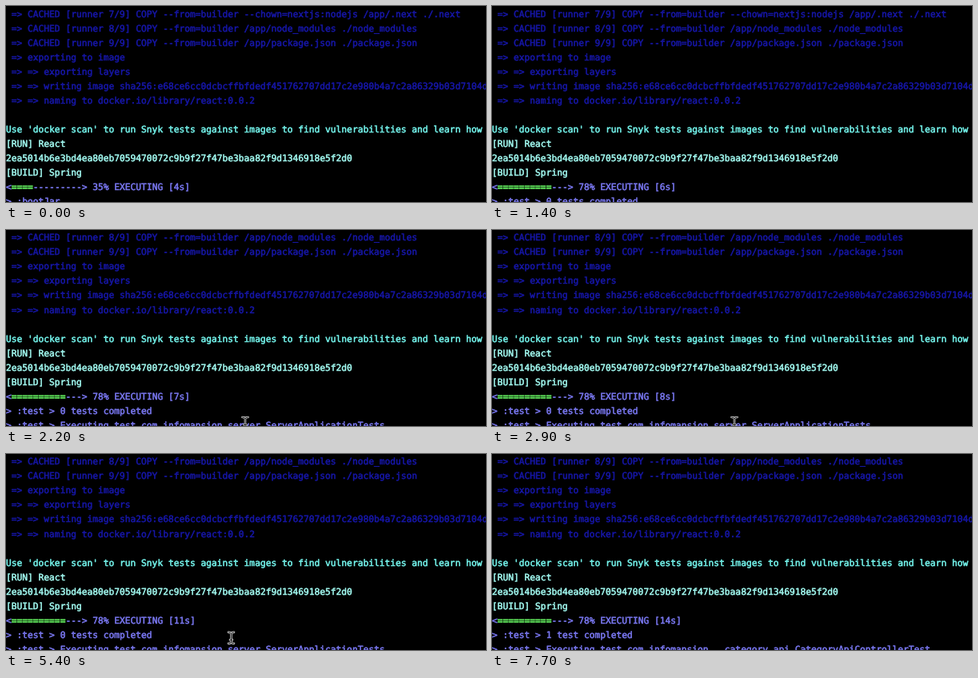
Recreate the animation shown at these times as an HTML page with a canvas. Size 600 px wide and 245 px high, loop 8000 ms.

```html
<!DOCTYPE html>
<html lang="en">
<head>
<meta charset="utf-8">
<title>Build log</title>
<style>
  html, body { margin: 0; width: 100%; height: 100%; overflow: hidden; background: #000; }
  canvas { display: block; }
</style>
</head>
<body>
<canvas id="stage" width="600" height="245"></canvas>
<script>
const ctx = document.getElementById('stage').getContext('2d');

const LOOP = 8000, STEP = 100;
const CELL = 6.765, LINE = 18.03;
const STATUS_Y = 230.1, SCROLL_AT = 2200, SCROLL_BY = 18.4;
const FONT = '11.24px "DejaVu Sans Mono", monospace';
const BLUE = '#1616a6', CYAN = '#74f4ec', PALE = '#a2faf1';
const LILAC = '#7a78f2', GREEN = '#5cdc58';

const LOG = [
  [BLUE, ' => CACHED [runner 7/9] COPY --from=builder --chown=nextjs:nodejs /app/.next ./.next'],
  [BLUE, ' => CACHED [runner 8/9] COPY --from=builder /app/node_modules ./node_modules'],
  [BLUE, ' => CACHED [runner 9/9] COPY --from=builder /app/package.json ./package.json'],
  [BLUE, ' => exporting to image'],
  [BLUE, ' => => exporting layers'],
  [BLUE, ' => => writing image sha256:e68ce6cc0dcbcffbfdedf451762707dd17c2e980b4a7c2a86329b03d7104d'],
  [BLUE, ' => => naming to docker.io/library/react:0.0.2'],
  [BLUE, ''],
  [CYAN, "Use 'docker scan' to run Snyk tests against images to find vulnerabilities and learn how"],
  [PALE, '[RUN] React'],
  [PALE, '2ea5014b6e3bd4ea80eb7059470072c9b9f27f47be3baa82f9d1346918e5f2d0'],
  [PALE, '[BUILD] Spring']
];

// Start time, percent done, lines under the progress bar
const PHASES = [
  [0, 35, '> :bootJar'],
  [600, 64, '> :compileTestJava'],
  [700, 64, '> :compileTestJava > Resolve dependencies of :testCompileClasspath'],
  [800, 78, '> :test > 0 tests completed'],
  [SCROLL_AT, 78, '> :test > 0 tests completed',
    '> :test > Executing test com.infomansion.server.ServerApplicationTests'],
  [6900, 78, '> :test > 1 test completed',
    '> :test > Executing test com.infomansion...category.api.CategoryApiControllerTest']
];

const TICKS = [300, 1000, 1800, 2700, 3500, 4300, 5200, 6100, 6900, 7700];

// Pointer moves: start, end, from, to, easing
const smooth = u => u * u * (3 - 2 * u);
const MOVES = [
  [1500, 2000, [306, 258], [299, 241], smooth],
  [2500, 2900, [299, 241], [303, 241], smooth],
  [3500, 3900, [303, 241], [488, 236], smooth],
  [4900, 5600, [488, 236], [-14, 221], u => u ** 2.64]
];

function write(text, col, y, color, weight = 'normal') {
  const x = col * CELL;
  ctx.font = `${weight} ${FONT}`;
  ctx.fillStyle = ctx.strokeStyle = color;
  ctx.fillText(text, x, y);
  ctx.strokeText(text, x, y);
}

function drawStatus(t, y) {
  const [, percent, ...lines] = PHASES.filter(p => p[0] <= t).pop();
  const seconds = 4 + TICKS.filter(k => k <= t).length;
  const done = Math.floor(percent * 13 / 100);
  write('<', 0, y, LILAC);
  write('='.repeat(done), 1, y, GREEN, 'bold');
  write('-'.repeat(13 - done) + '>', 1 + done, y, LILAC);
  write(`${percent}% EXECUTING [${seconds}s]`, 16, y, LILAC);
  lines.forEach((line, i) => write(line, 0, y + (i + 1) * LINE, LILAC));
}

function pointerAt(t) {
  const move = MOVES.filter(m => m[0] <= t).pop();
  if (!move) return null;
  const [start, end, from, to, ease] = move;
  const u = ease(Math.min(1, (t - start) / (end - start)));
  return from.map((v, i) => v + (to[i] - v) * u);
}

function drawPointer([x, y]) {
  ctx.save();
  ctx.translate(x, y);
  ctx.beginPath();
  for (const s of [-1, 1]) {
    ctx.moveTo(-3.5, s * 7);
    ctx.quadraticCurveTo(0, s * 7, 0, s * 5);
    ctx.quadraticCurveTo(0, s * 7, 3.5, s * 7);
  }
  ctx.moveTo(0, -5);
  ctx.lineTo(0, 5);
  ctx.moveTo(-1.5, 2.5);
  ctx.lineTo(1.5, 2.5);
  ctx.lineCap = 'round';
  ctx.lineWidth = 2.6;
  ctx.strokeStyle = '#d0d0d0';
  ctx.stroke();
  ctx.lineWidth = 1;
  ctx.strokeStyle = '#1c1c1c';
  ctx.stroke();
  ctx.restore();
}

function draw(t) {
  ctx.fillStyle = '#000';
  ctx.fillRect(0, 0, 600, 245);
  ctx.textRendering = 'geometricPrecision';
  ctx.lineWidth = 0.55;
  ctx.lineJoin = 'round';
  const y = STATUS_Y - (t >= SCROLL_AT ? SCROLL_BY : 0);
  LOG.forEach(([color, text], i) => write(text, 0, y - (LOG.length - i) * LINE, color));
  drawStatus(t, y);
  const pointer = pointerAt(t);
  if (pointer) drawPointer(pointer);
}

const began = performance.now();
function frame() {
  const t = (performance.now() - began) % LOOP;
  draw(Math.floor(t / STEP) * STEP);
  requestAnimationFrame(frame);
}
frame();
</script>
</body>
</html>
```
